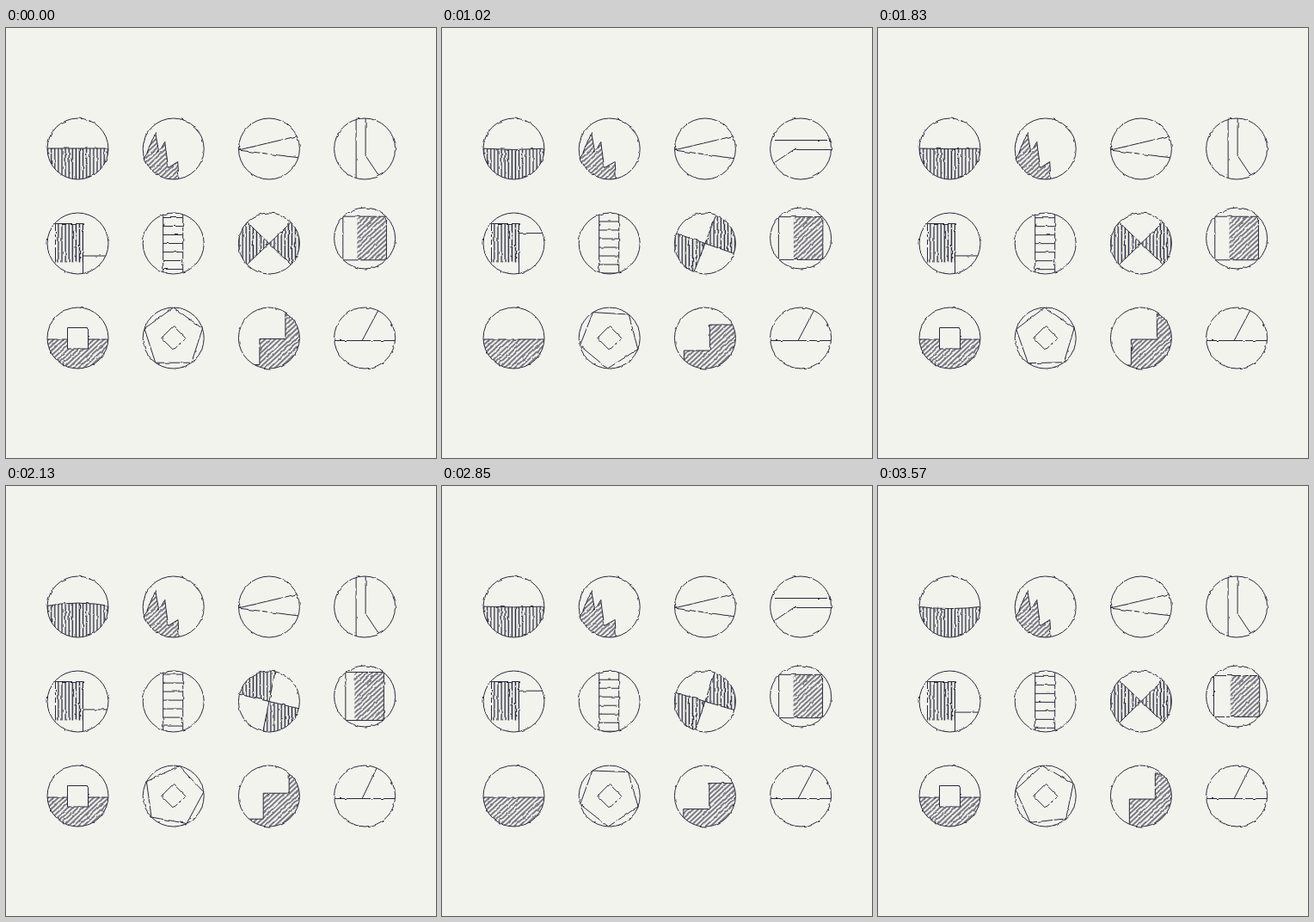
These frames come from a looping animation (500x500 px, 3.6 s). An HTML page:

```html
<!DOCTYPE html>
<html lang="en">
<head>
<meta charset="utf-8">
<title>Twelve sketched discs</title>
<style>
  html, body { margin: 0; width: 100%; height: 100%; overflow: hidden; background: #f2f3ed; }
  svg { display: block; width: 500px; height: 500px; }
  #icons { fill: none; stroke: #29283c; stroke-width: 1; }
</style>
</head>
<body>
<svg viewBox="0 0 500 500">
  <defs>
    <filter id="rough" filterUnits="userSpaceOnUse" x="0" y="0" width="500" height="500" color-interpolation-filters="sRGB">
      <feTurbulence type="fractalNoise" baseFrequency=".12" numOctaves="2" seed="4"/>
      <feDisplacementMap in="SourceGraphic" scale="2.6" xChannelSelector="R" yChannelSelector="G"/>
    </filter>
    <clipPath id="disc"><circle r="35.5"/></clipPath>
    <pattern id="bars" width="4.1" height="80" patternUnits="userSpaceOnUse">
      <path d="M2 0V80" stroke="#29283c" stroke-width="1.4"/>
    </pattern>
    <pattern id="slant" width="4" height="80" patternUnits="userSpaceOnUse" patternTransform="rotate(47)">
      <path d="M2 0V80" stroke="#29283c" stroke-width="1.2"/>
    </pattern>
  </defs>
  <g id="icons" filter="url(#rough)"></g>
</svg>
<script>
const LOOP = 3600, CYCLE = 1865, TAU = Math.PI * 2;
const clamp = v => Math.min(1, Math.max(0, v));
const span = (p, a, b) => clamp((p - a) / (b - a));
const inOut = x => x < .5 ? 4 * x ** 3 : 1 - 4 * (1 - x) ** 3;

const path = (d, fill = 'none', extra = '') => `<path d="${d}" fill="${fill}" ${extra}/>`;
const bars = d => path(d, 'url(#bars)');
const slant = d => path(d, 'url(#slant)');
const spin = deg => `transform="rotate(${deg})"`;

// Closed shape from [angle, radius] pairs, angles in degrees
const polar = points => 'M' + points.map(([a, r]) =>
  `${r * Math.cos(a * TAU / 360)} ${r * Math.sin(a * TAU / 360)}`).join('L') + 'Z';

const icons = [
  function water(p) {
    return bars(`M-40 -.5Q0 ${-.5 - 10 * Math.sin(TAU * p)} 40 -.5V40H-40Z`);
  },
  function peaks(p) {
    const sway = 1.5 * Math.sin(Math.PI * p) ** 2;
    return slant(`M-36 17L-21 -19L-17 4L-10 -8L-6 22L${5 + sway} 15L${6.5 + sway} 40H-36Z`);
  },
  function beam(p) {
    const low = 10.5 + Math.sin(Math.PI * p) ** 2;
    return path(`M36 -15.5L-36 1.5L36 ${low}`);
  },
  function bend(p) {
    const turn = 90 * (inOut(span(p, .19, .5)) - inOut(span(p, .58, .89)));
    return path('M-10 -40V40M1 -40V8L21 38', 'none', spin(turn));
  },
  function shelf(p) {
    const y = 14.5 - 27 * Math.sin(Math.PI * p) ** 2;
    return '<rect x="-26" y="-23" width="32" height="45" fill="url(#bars)" stroke="none"/>' +
      path(`M-26 22V-23H6V40M6 ${y}H40`);
  },
  function ladder(p) {
    let d = 'M-12 -40V40M11 -40V40';
    for (let i = -4; i < 5; i++) d += `M-12 ${i * 10 - 10 * p}H11`;
    return path(d);
  },
  function bowTie(p) {
    const turn = 180 * (1 - (1 - p) ** 2.5);
    return bars(polar([-136, 56, 44, 56, -44, 56, 136, 56].reduce((list, v, i, all) =>
      i % 2 ? list : [...list, [v + turn, all[i + 1]]], [])));
  },
  function panel(p) {
    const s = Math.sin(TAU * p), w = 25.3 - 5 * s * Math.abs(s), h = Math.sqrt(35.8 ** 2 - w * w);
    return `<rect x="${w - 34}" y="${-h}" width="34" height="${2 * h}" fill="url(#slant)" stroke="none"/>` +
      path(`M${-w} ${-h}H${w}V${h}H${-w}Z`);
  },
  function block(p) {
    const x = p < .55 ? 52 * span(p, .2, .5) ** 3 : -52 * (1 - span(p, .58, .88)) ** 3;
    return slant('M-40 1.5H40V40H-40Z') + path(`M${x - 12} -12h24v24.5h-24Z`, '#f2f3ed');
  },
  function pentagon(p) {
    const corners = [0, 1, 2, 3, 4].map(i => [72 * (i + p) - 90, 35.5]);
    return path(polar(corners)) + path('M0 -14L14 0L0 14L-14 0Z');
  },
  function stairs(p) {
    const shift = 30 * p;
    return slant(`M${49 + shift} ${-59 - shift}${'v30h-30'.repeat(6)}V90H120V-120Z`);
  },
  function needle(p) {
    const a = (26 + 2 * Math.cos(2 * TAU * p)) * TAU / 360;
    return path(`M-40 3H40M-3 3L${-3 + 44 * Math.sin(a)} ${3 - 44 * Math.cos(a)}`);
  }
];

const stage = document.getElementById('icons');

function draw() {
  const p = performance.now() % LOOP % CYCLE / CYCLE;
  stage.innerHTML = icons.map((icon, i) => {
    const x = 83.5 + i % 4 * 111.2;
    const y = 140.5 + Math.floor(i / 4) * 110 - (icon.name === 'panel' ? 6 : 0);
    return `<g transform="translate(${x} ${y})"><g clip-path="url(#disc)">${icon(p)}</g><circle r="35.5"/></g>`;
  }).join('');
  requestAnimationFrame(draw);
}
draw();
</script>
</body>
</html>
```
